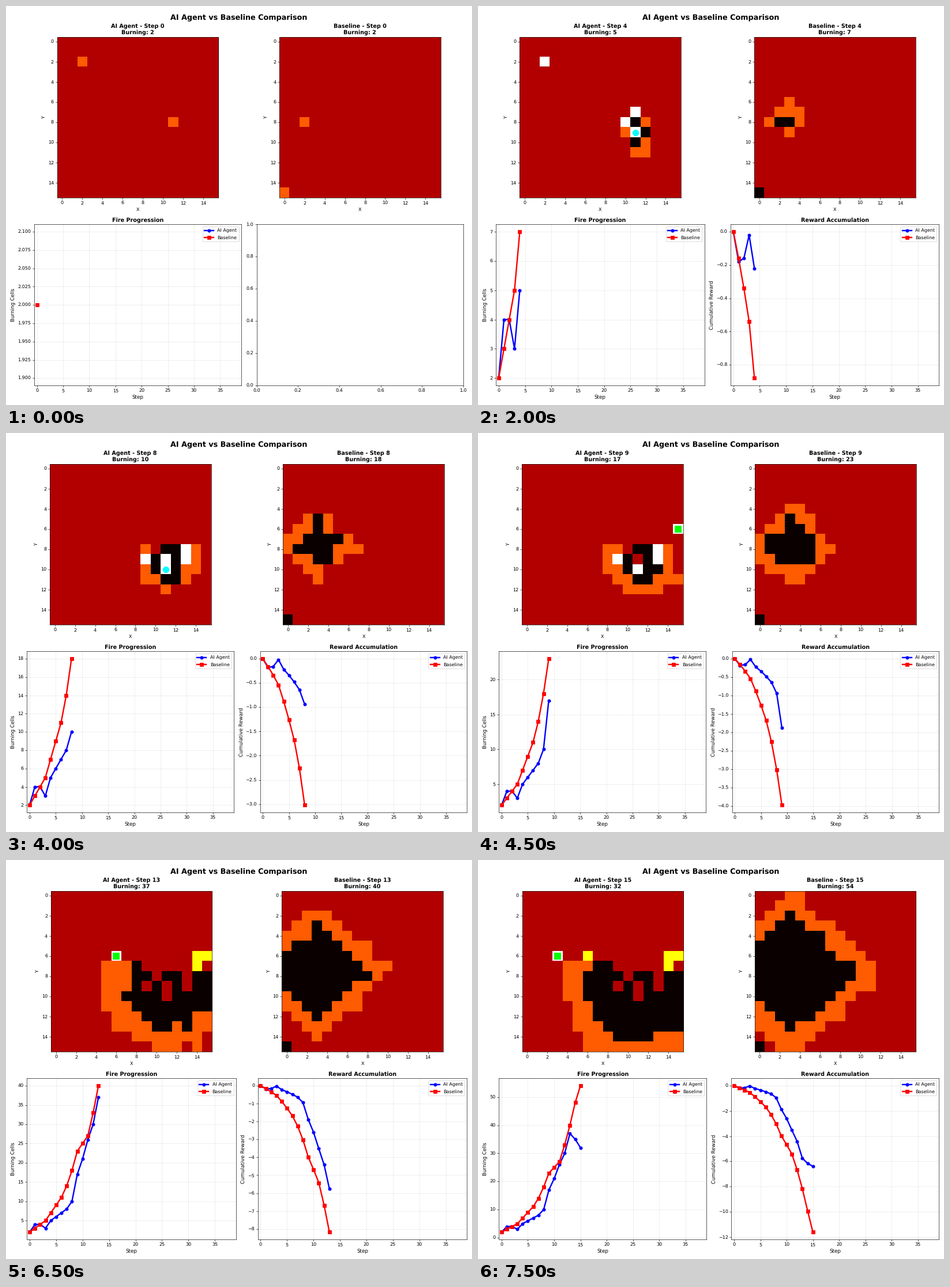
A matplotlib script for the animation above (8 s loop, 808 by 693 pixels).

```python
import numpy as np
import matplotlib.pyplot as plt
from matplotlib.animation import FuncAnimation

W, H = 808, 693
DPI = W / 14
SIZE, STEPS = 16, 16
BURN_TIME, WET_TIME = 3, 5
NEVER = 99
BURNT, TREE, FIRE, BREAK, WET = range(5)

plt.rcParams["text.hinting"] = "none"

# Burning cells at each step
agent_burning = [2, 4, 4, 3, 5, 6, 7, 8, 10, 17, 21, 26, 30, 37, 35, 32]
base_burning = [2, 3, 4, 5, 7, 9, 11, 14, 18, 23, 25, 27, 33, 40, 48, 54]

# What the agent does: cell -> step
water = {(2, 2): 1, (11, 7): 2, (10, 8): 3, (11, 9): 4,
         (9, 9): 5, (13, 9): 6, (13, 8): 7, (11, 10): 8}
breaks = {(15, 6): 9, (14, 7): 10, (14, 6): 11, (6, 6): 13, (3, 6): 15}

rng = np.random.default_rng(4)
y, x = np.mgrid[:SIZE, :SIZE]
rough = rng.uniform(-.5, .5, (2, SIZE, SIZE))

# Order in which the fire reaches each cell
agent_reach = np.hypot(x - 11.3, 1.1 * (y - 9.3)) + rough[0]
agent_reach[y < np.where(x > 8, 8, 7)] = np.inf
base_reach = .9 * abs(x - 3.1) + abs(y - 7.6) + rough[1]


def wet_mask(step, doused):
    mask = np.zeros((SIZE, SIZE), bool)
    for (cx, cy), t in doused.items():
        mask[cy, cx] = t <= step
    return mask


def spread(burning, sparks, reach, doused):
    """Step at which every cell catches fire."""
    lit = np.full((SIZE, SIZE), NEVER)
    for cx, cy in sparks:
        lit[cy, cx] = 0
    for step in range(1, STEPS):
        wet = wet_mask(step, doused)
        active = (lit < step) & (lit > step - BURN_TIME) & ~wet
        fresh = max(burning[step] - active.sum(), 0)
        order = np.argsort(np.where(wet | (lit < NEVER), np.inf, reach), axis=None)
        lit.flat[order[:fresh]] = step
    return lit


agent_lit = spread(agent_burning, [(2, 2), (11, 8)], agent_reach, water)
base_lit = spread(base_burning, [(2, 8), (0, 15)], base_reach, {})


def rewards(burning, bonus):
    """Running reward: growth and burning cells cost, actions earn a bonus."""
    step_reward = bonus - .1 * np.diff(burning) - .02 * np.array(burning[1:])
    return np.concatenate([[0], np.cumsum(step_reward)])


agent_reward = rewards(agent_burning, .1)
base_reward = rewards(base_burning, 0)


def burn_state(lit, step):
    grid = np.full(lit.shape, TREE)
    grid[lit <= step] = FIRE
    grid[lit <= step - BURN_TIME] = BURNT
    return grid


def agent_state(step):
    grid = burn_state(agent_lit, step)
    for (cx, cy), t in water.items():
        if t <= step:
            grid[cy, cx] = WET if step < t + WET_TIME else TREE
    for (cx, cy), t in breaks.items():
        if t <= step:
            grid[cy, cx] = WET if step == t else BREAK
    return grid


fig, axes = plt.subplots(2, 2, figsize=((W + .01) / DPI, (H + .01) / DPI), dpi=DPI)
fig.suptitle("AI Agent vs Baseline Comparison", fontsize=16, fontweight="bold")


def draw_map(ax, grid, name, step, burning):
    ax.imshow(grid, cmap="hot", vmin=0, vmax=4)
    ax.set_title(f"{name} - Step {step}\nBurning: {burning[step]}", fontweight="bold")
    ax.set_xlabel("X")
    ax.set_ylabel("Y")


def mark_action(ax, step, actions, color, marker):
    for cell, t in actions.items():
        if t == step:
            ax.scatter(*cell, s=200, c=color, marker=marker, linewidths=0)


def draw_curves(ax, step, agent, base, title, ylabel):
    steps = range(step + 1)
    ax.plot(steps, agent[:step + 1], "b-o", lw=3, ms=6.5, label="AI Agent")
    ax.plot(steps, base[:step + 1], "r-s", lw=3, ms=6.5, label="Baseline")
    ax.set_title(title, fontweight="bold")
    ax.set_xlabel("Step", fontsize=11)
    ax.set_ylabel(ylabel, fontsize=11)
    ax.set_xlim(-.5, 39)
    ax.grid(alpha=.3)
    ax.legend(loc="upper right")


def update(step):
    for ax in axes.flat:
        ax.clear()
    (left, right), (fire, reward) = axes
    draw_map(left, agent_state(step), "AI Agent", step, agent_burning)
    draw_map(right, burn_state(base_lit, step), "Baseline", step, base_burning)
    mark_action(left, step, water, "cyan", "o")
    mark_action(left, step, breaks, "lime", "s")
    draw_curves(fire, step, agent_burning, base_burning,
                "Fire Progression", "Burning Cells")
    if step > 0:
        draw_curves(reward, step, agent_reward, base_reward,
                    "Reward Accumulation", "Cumulative Reward")
    fig.tight_layout()
    fig.subplots_adjust(top=1 - 53.6 / H, bottom=1 - 659 / H, hspace=.165)


anim = FuncAnimation(fig, update, frames=STEPS, interval=500, repeat=True)
plt.show()
```
